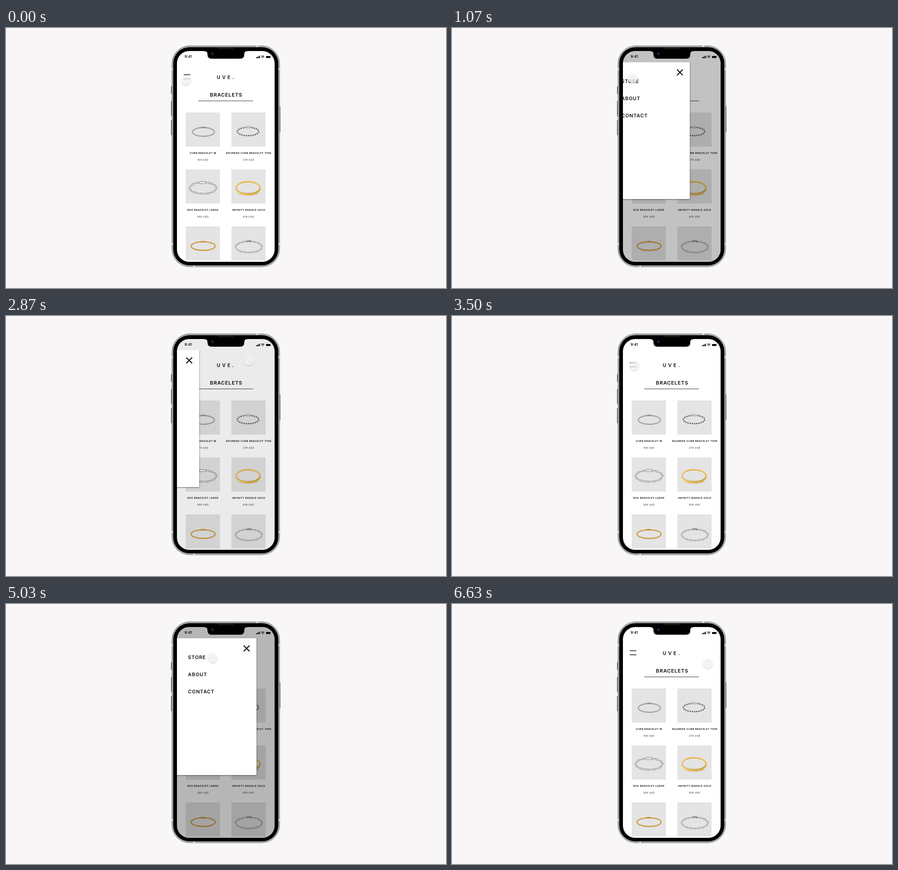
Animation, 973 px wide and 576 px high, one loop 6760 ms. Source, as an HTML page:

```html
<!DOCTYPE html>
<html lang="en">
<head>
<meta charset="utf-8">
<title>Shop menu</title>
<style>
  html, body { margin: 0; width: 100%; height: 100%; overflow: hidden; background: #f8f6f7; }
  svg { display: block; width: 973px; height: 576px; }
  text { font-family: Inter, sans-serif; font-weight: 600; fill: #0c0c0c; }
  .mid { text-anchor: middle; }
  .name { font-size: 5.4px; letter-spacing: .52px; }
  .price { font-size: 5.3px; letter-spacing: .42px; font-weight: 400; fill: #222; }
  .item { font-size: 10.5px; letter-spacing: 1px; }
</style>
</head>
<body>
<svg viewBox="0 0 973 576">
  <defs>
    <clipPath id="screen"><rect x="378" y="51" width="216" height="467" rx="27"/></clipPath>
    <clipPath id="below"><rect x="378" y="76" width="216" height="442"/></clipPath>
    <linearGradient id="gold" x1="0" x2="1" y1="0" y2="1">
      <stop offset="0" stop-color="#e9b94c"/><stop offset=".5" stop-color="#f0ca6a"/><stop offset="1" stop-color="#c98f22"/>
    </linearGradient>
    <filter id="soft" x="-50%" y="-50%" width="200%" height="200%">
      <feDropShadow dx="0" dy="1.4" stdDeviation="1" flood-color="#000" flood-opacity=".27"/>
    </filter>
    <filter id="edge" x="-10%" y="-10%" width="120%" height="120%">
      <feDropShadow dx=".6" dy="1.2" stdDeviation="1" flood-color="#000" flood-opacity=".5"/>
    </filter>
  </defs>

  <g fill="#77777a">
    <rect x="364.8" y="129" width="3" height="17" rx="1"/>
    <rect x="364.8" y="161.500" width="3" height="34" rx="1"/>
    <rect x="364.8" y="204" width="3" height="33.500" rx="1"/>
    <rect x="603.800" y="173" width="3" height="58" rx="1"/>
  </g>
  <rect x="367" y="39.500" width="238" height="489.500" rx="39" fill="#b2b3b2" stroke="#737573"/>
  <g fill="#e4e4e3">
    <rect x="553.500" y="39.200" width="4" height="4"/>
    <rect x="414" y="525.500" width="4" height="4"/>
    <path d="M366.500 89.500h4v3.500h-4zM601.500 89.500h4v3.500h-4zM366.500 476.500h4v3.500h-4zM601.500 476.500h4v3.500h-4z"/>
  </g>
  <rect x="369.700" y="42.500" width="232.600" height="483.500" rx="36" fill="#000"/>

  <g clip-path="url(#screen)">
    <rect x="378" y="51" width="216" height="467" fill="#fff"/>
    <text x="395" y="66.300" font-size="8">9:41</text>
    <g fill="#0c0c0c">
      <path d="M553 64.800h1.700v2.200h-1.700zM555.300 63.800h1.700v3.200h-1.700zM557.600 62.600h1.700v4.400h-1.700zM559.900 61.200h1.700v5.800h-1.700z"/>
      <rect x="575" y="62" width="9.600" height="4.600" rx="1.200"/>
      <rect x="585.100" y="63.400" width=".8" height="1.900" rx=".4"/>
      <path d="M566.500 65.200a2 2 0 0 1 2.600 0l-1.300 1.700z"/>
    </g>
    <path d="M564.400 63a5 5 0 0 1 6.800 0M565.600 64.500a3.300 3.300 0 0 1 4.400 0" fill="none" stroke="#0c0c0c" stroke-width="1.100"/>
    <path d="M393 103.500h14.700M393 112.500h14.700" stroke="#111" stroke-width="1.500"/>
    <text x="466" y="112.800" font-size="10.500" letter-spacing="4.200">UVE.</text>
    <text class="mid" x="486.900" y="152.200" font-size="11" letter-spacing=".85">BRACELETS</text>
    <path d="M425.300 161.500h121" stroke="#333" stroke-width="1"/>
    <g id="goods"></g>
    <rect id="shade" x="378" y="51" width="216" height="467" fill="#000"/>
    <g clip-path="url(#below)">
      <g id="menu">
        <rect x="370" y="70" width="184" height="309" fill="#fff" filter="url(#edge)"/>
        <text class="item" x="402.600" y="121.900">STORE</text>
        <text class="item" x="402.600" y="159.700">ABOUT</text>
        <text class="item" x="402.600" y="197.500">CONTACT</text>
        <path d="M525.700 92l12.800 12.800M538.500 92l-12.800 12.800" stroke="#0c0c0c" stroke-width="2.200"/>
      </g>
    </g>
    <circle id="dot" r="10.700"/>
  </g>

  <path d="M438 50h96v1.300q-7 0-7 6v1.200q0 9.500-9.500 9.500h-62.500q-9.500 0-9.500-9.500v-1.200q0-6-7.500-6z" fill="#000"/>
  <rect x="468" y="43.500" width="36" height="3.500" rx="1.700" fill="#191919"/>
  <circle cx="456.500" cy="57" r="4" fill="#0b1420"/>
  <circle cx="456.500" cy="57" r="1.900" fill="#173354"/>
</svg>
<script>
const LOOP = 6760, WIDTH = 176;
const $ = id => document.getElementById(id);

// ----- product grid -----
const ring = (x, y, rx, ry, color, w, extra = '') =>
  `<ellipse cx="${x}" cy="${y}" rx="${rx}" ry="${ry}" fill="none" stroke="${color}" stroke-width="${w}" ${extra}/>`;

// Places n parts evenly along an ellipse, each turned to follow it.
function chain(x, y, rx, ry, n, part) {
  const pts = [], N = 720;
  let len = 0;
  for (let i = 0; i <= N; i++) {
    const a = i / N * 2 * Math.PI;
    if (i) len += Math.hypot(rx * Math.sin(a), ry * Math.cos(a));
    pts.push([a, len]);
  }
  let out = '';
  for (let k = 0; k < n; k++) {
    const a = pts.find(p => p[1] >= (k + .5) / n * len)[0];
    const px = x + rx * Math.cos(a), py = y + ry * Math.sin(a);
    const turn = Math.atan2(ry * Math.cos(a), -rx * Math.sin(a)) * 180 / Math.PI;
    out += `<g transform="translate(${px.toFixed(2)} ${py.toFixed(2)}) rotate(${turn.toFixed(1)})">${part(k)}</g>`;
  }
  return out;
}

const link = (w, h, color, s) =>
  `<rect x="${-w / 2}" y="${-h / 2}" width="${w}" height="${h}" rx="${h / 2}" fill="none" stroke="${color}" stroke-width="${s}"/>`;

const clasp = (x, y, color) =>
  `<path d="M${x - 6} ${y + .8}q4-2.600 7-.6t5-.4M${x - 3} ${y - .9}q4-.6 8 1.200" fill="none" stroke="${color}" stroke-width="1.300"/>`;

const cord = (x, y, rx, ry, dark, light) =>
  ring(x, y + 1, rx, ry, '#00000018', 2.4) +
  ring(x, y, rx, ry, dark, 2) + ring(x, y, rx, ry, light, .8, 'stroke-dasharray="1.200 .8"') +
  clasp(x - 1, y - ry, dark);

const art = [
  cord(436.5, 230, 24.3, 9.8, '#8b8b8b', '#d2d2d2'),
  ring(535.3, 229.3, 23.7, 9.2, '#8d8d8d', 2.4) +
    chain(535.3, 229.3, 23.7, 9.2, 44, k => `<ellipse rx="1" ry="1.500" fill="${k % 2 ? '#dcdcdc' : '#4c4c4c'}"/>`) +
    '<rect x="529.500" y="218" width="11" height="3.200" rx="1" fill="#d4d4d4" stroke="#828282" stroke-width=".7"/>',
  chain(435.7, 354.5, 29.3, 12.6, 20, k => k % 2 ? link(9, 3, '#8a8a8a', 1) : link(3.6, 2, '#a5a5a5', .9)) +
    '<rect x="428.500" y="340" width="13.500" height="5" rx="1.500" fill="#ececec" stroke="#7c7c7c" stroke-width="1"/>',
  '<ellipse cx="536" cy="368" rx="23" ry="3.500" fill="#00000014"/>' +
    '<path fill-rule="evenodd" fill="url(#gold)" d="M507 355a28.300 16.300 0 1 1 56.600 0a28.300 16.300 0 1 1-56.600 0zM509.600 353.800a25.500 12.300 0 1 0 51 0a25.500 12.300 0 1 0-51 0z"/>' +
    ring(535.2, 354, 25.5, 12.4, '#b98220', .7) + ring(535.3, 356, 27, 13.5, '#f7dd92', .7),
  cord(436, 483, 26.7, 9.6, '#c98b1e', '#efc45e'),
  chain(537, 485, 29, 12.3, 30, k => k % 2 ? link(5.6, 2.6, '#878787', .9) : link(3, 1.4, '#b0b0b0', 1)) +
    clasp(537, 472.3, '#777')
];

const labels = [
  ['CURB BRACELET M', '169 USD'], ['ROUNDED CURB BRACELET THIN', '279 USD'],
  ['BOX BRACELET LARGE', '309 USD'], ['INFINITY BANGLE GOLD', '819 USD'],
  ['', ''], ['', '']
];

$('goods').innerHTML = labels.map(([name, price], i) => {
  const x = i % 2 ? 498.5 : 397.4, y = 187.2 + 126.1 * (i >> 1), cx = x + 37.9;
  return `<rect x="${x}" y="${y}" width="75.600" height="75.600" fill="#e4e4e4"/>${art[i]}` +
    `<text class="mid name" x="${cx + .3}" y="${y + 91.3}">${name}</text>` +
    `<text class="mid price" x="${cx + .1}" y="${y + 106.5}">${price}</text>`;
}).join('');

// ----- motion -----
const clamp = v => Math.max(0, Math.min(1, v));
const out = (p, n) => 1 - Math.pow(1 - clamp(p), n);
const slide = (t, t0, dur) => out((t - t0) / dur, 2);

// start, end, x, y
const moves = [
  [370, 500, 400, 111],
  [1180, 1700, 430, 119],
  [1857, 2637, 537, 99],
  [3130, 3830, 388, 111],
  [3960, 4130, 393, 112],
  [4865, 6030, 566, 132]
];
const presses = [[830, 1000], [2630, 2830], [4370, 4570], [6200, 6390]];

function draw(t) {
  const open = slide(t, 990, 135) - slide(t, 2812, 125) + slide(t, 4562, 135) - slide(t, 6390, 125);
  $('menu').setAttribute('transform', `translate(${((open - 1) * WIDTH).toFixed(2)} 0)`);
  $('menu').style.display = open > .001 ? '' : 'none';
  $('shade').setAttribute('opacity', (.286 * open).toFixed(4));

  let x = 398, y = 116;
  for (const [a, b, mx, my] of moves) {
    const p = out((t - a) / (b - a), 3);
    x += (mx - x) * p;
    y += (my - y) * p;
  }
  const down = presses.some(([a, b]) => t >= a && t < b);
  const dot = $('dot');
  dot.setAttribute('transform', `translate(${x.toFixed(2)} ${y.toFixed(2)})`);
  dot.setAttribute('fill', down ? 'rgba(255,255,255,.6)' : 'rgba(247,247,247,.72)');
  dot.setAttribute('filter', down ? 'none' : 'url(#soft)');
}

const start = performance.now();
function tick() {
  draw((performance.now() - start) % LOOP);
  requestAnimationFrame(tick);
}
tick();
</script>
</body>
</html>
```
